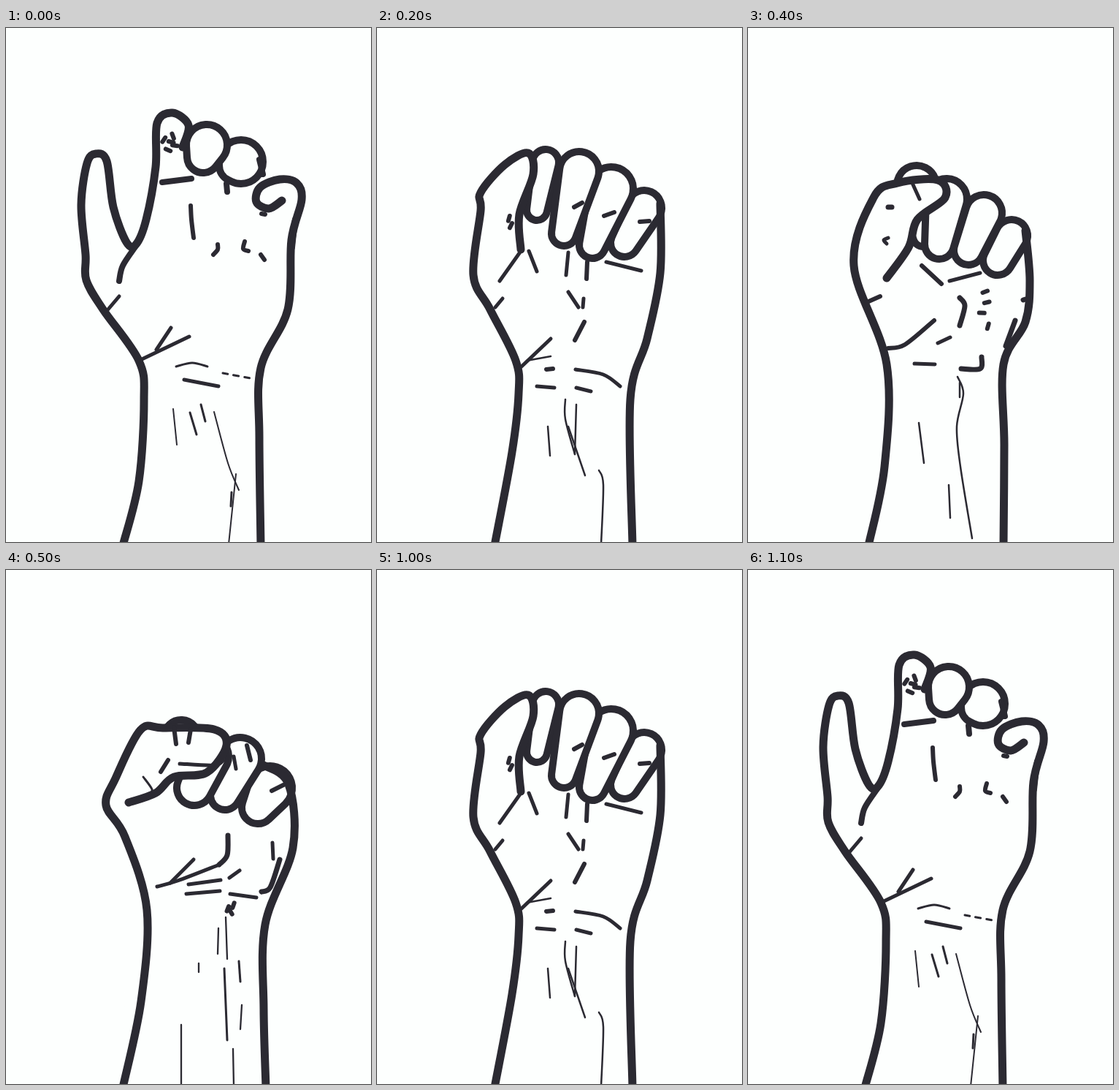
These frames come from a looping animation (500x703 px, 1500 ms). An HTML page with a canvas:

```html
<!DOCTYPE html>
<html lang="en">
<head>
<meta charset="utf-8">
<title>Closing hand</title>
<style>
html, body { margin: 0; height: 100%; overflow: hidden; background: #fdfffe; }
canvas { display: block; }
</style>
</head>
<body>
<canvas id="stage" width="500" height="703"></canvas>
<script>
const ctx = document.getElementById('stage').getContext('2d');
const PAPER = '#fdfffe', INK = '#2b2a32', BOLD = 11;
ctx.lineCap = ctx.lineJoin = 'round';

// Smooth curve through a few key points.
function trace(points) {
  const p = points.split(' ').map(s => s.split(',').map(Number));
  ctx.beginPath();
  ctx.moveTo(...p[0]);
  for (let i = 0; i < p.length - 1; i++) {
    const a = p[i - 1] || p[i], b = p[i], c = p[i + 1], d = p[i + 2] || c;
    ctx.bezierCurveTo(
      b[0] + (c[0] - a[0]) / 6, b[1] + (c[1] - a[1]) / 6,
      c[0] - (d[0] - b[0]) / 6, c[1] - (d[1] - b[1]) / 6, ...c);
  }
}

function ink(width, ...strokes) {
  ctx.lineWidth = width;
  for (const points of strokes) {
    trace(points);
    ctx.stroke();
  }
}

// Thumb side: covers the fingers behind it.
function thumb(points) {
  trace(points);
  ctx.fill();
  ctx.lineWidth = BOLD;
  ctx.stroke();
}

// Tapered finger between two circles, knuckle first.
function finger(x1, y1, r1, x2, y2, r2) {
  const a = Math.atan2(y2 - y1, x2 - x1);
  const d = Math.acos((r1 - r2) / Math.hypot(x2 - x1, y2 - y1));
  ctx.beginPath();
  ctx.arc(x1, y1, r1, a + d, a - d);
  ctx.arc(x2, y2, r2, a - d, a + d);
  ctx.closePath();
  ctx.fill();
  ctx.lineWidth = BOLD - 1;
  ctx.stroke();
}

function random(n) {
  const s = Math.sin(n * 127.1) * 43758.5453;
  return s - Math.floor(s);
}

// Short marks scattered around a point.
function specks(count, x, y, w, h) {
  ctx.lineWidth = 6;
  for (let i = 0; i < count; i++) {
    const px = x + w * (random(x + i) - 0.5);
    const py = y + h * ((i + 0.5) / count - 0.5);
    const a = Math.PI * random(y + i);
    ctx.beginPath();
    ctx.moveTo(px, py);
    ctx.lineTo(px + 7 * Math.cos(a), py + 7 * Math.sin(a));
    ctx.stroke();
  }
}

function open() {
  finger(322, 183, 30, 314, 188, 22);
  finger(275, 160, 28, 270, 176, 22);
  ink(BOLD, '160,708 182,620 189,510 182,455 133,385 110,345 109,310 103,242 111,185 123,172 138,182 147,245 165,293 178,296 192,262 205,190 207,130 228,116 250,133 242,163',
    '378,236 360,247 343,238 348,218 375,207 398,212 405,235 391,290 386,385 349,465 347,560 349,708');
  ink(8, '178,298 160,325 155,346', '347,180 352,200', '302,213 303,224', '214,211 254,206', '396,262 392,300');
  specks(5, 224, 155, 14, 26);
  ink(6, '253,243 254,262 257,287', '290,296 290,303 284,310', '327,292 325,302 332,305', '349,310 354,317', '350,254 355,255');
  ink(5, '182,455 251,422', '226,410 206,440', '155,367 138,387', '244,481 291,490');
  ink(3, '233,463 255,458 276,463', '252,526 261,556', '267,515 273,538', '309,635 308,654');
  ctx.setLineDash([7, 8]);
  ink(3, '297,472 340,480');
  ctx.setLineDash([]);
  ink(2, '229,521 234,570', '285,525 304,595 319,632', '315,610 305,706');
}

function curl() {
  finger(231, 184, 18, 219, 249, 14);
  finger(366, 246, 24, 339, 294, 19);
  finger(321, 220, 30, 295, 297, 18);
  finger(277, 196, 27, 256, 281, 17);
  thumb('161,708 185,580 194,500 190,455 155,385 132,338 142,250 142,225 175,187 207,171 214,200 195,255 197,303');
  ink(BOLD, '388,240 388,335 370,425 347,508 350,708');
  specks(2, 183, 262, 4, 20);
  ink(6, '270,245 281,239', '311,257 325,252', '360,265 373,264', '288,320 287,343', '284,402 271,427', '232,467 241,466');
  ink(5, '195,308 168,346', '172,370 162,382', '208,305 219,333', '262,307 259,338', '262,361 276,382', '283,370 282,382',
    '314,320 362,332', '198,463 238,425', '219,490 243,492', '273,492 293,497', '272,467 310,474 333,490');
  ink(2.5, '205,455 238,449', '258,508 258,535 271,583', '273,515 271,583', '262,545 285,612', '234,545 237,585', '304,605 310,625 307,706');
}

function fold() {
  finger(250, 199, 26, 245, 266, 15);
  finger(378, 262, 24, 357, 314, 18);
  finger(343, 234, 30, 318, 314, 18);
  finger(297, 213, 27, 275, 311, 20);
  thumb('158,708 187,585 194,450 157,345 157,315 179,220 200,210 265,208 265,226 218,260 222,297');
  ink(BOLD, '380,239 401,252 397,350 388,420 356,485 353,600 352,708');
  specks(4, 266, 302, 10, 26);
  specks(3, 372, 305, 20, 16);
  ink(7, '225,303 190,346', '193,367 175,376', '302,387 297,407', '336,366 336,378', '307,340 307,346');
  ink(6, '346,405 360,402', '374,405 376,418', '207,448 250,437 302,416', '281,488 325,497', '288,466 300,470');
  ink(5, '288,246 290,253', '275,342 292,378', '207,445 250,424', '270,443 289,435', '237,462 278,457', '248,482 266,483', '311,474 349,482');
  ink(2.3, '240,530 243,593', '263,552 276,600 276,706', '299,505 304,604', '305,640 306,706', '283,506 287,519');
}

function tuck() {
  finger(231, 215, 27, 240, 285, 14);
  finger(361, 284, 22, 342, 318, 20);
  finger(323, 253, 25, 302, 304, 20);
  finger(272, 234, 28, 262, 296, 20);
  thumb('165,708 187,600 190,460 145,325 172,232 205,212 260,208 270,232 232,262 220,300 190,342');
  ink(BOLD, '380,277 386,345 380,402 350,460 351,570 350,708');
  specks(4, 322, 382, 18, 60);
  ink(7, '290,369 297,380 290,407', '292,466 318,466 320,450', '366,400 353,435', '192,245 197,245', '377,372 380,371');
  ink(6, '163,375 181,367', '238,325 265,350', '255,400 215,433 192,438');
  ink(5, '225,212 235,234', '276,346 318,335', '260,431 277,423', '228,459 256,460', '192,287 186,290 190,295');
  ink(2.5, '287,477 295,500 286,545 291,600 307,698', '290,485 290,505', '234,540 241,595', '275,625 277,670');
}

function fist() {
  finger(240, 229, 24, 240, 250, 10);
  finger(362, 298, 30, 345, 325, 22);
  finger(321, 258, 29, 300, 308, 20);
  finger(278, 255, 27, 258, 298, 24);
  thumb('160,708 185,590 193,465 163,365 137,322 150,285 184,219 215,216 285,218 302,240 275,277 230,283 205,305 168,318');
  ink(BOLD, '351,266 387,293 393,380 355,485 353,600 356,708');
  specks(3, 308, 460, 10, 14);
  ink(7, '304,363 303,390 292,403', '375,396 362,434 350,440');
  ink(6, '230,215 233,238', '253,218 250,236', '212,276 222,260', '364,302 380,294', '335,260 330,240');
  ink(5, '312,255 315,272', '292,403 235,425 207,433', '225,428 257,396', '250,430 294,424', '247,443 293,439',
    '306,421 320,411', '307,443 343,448', '365,373 366,395', '238,265 285,267 298,260');
  ink(3, '299,545 303,643', '319,535 321,563', '188,283 200,300 197,308');
  ink(2.3, '291,490 290,525', '301,475 303,532', '264,538 264,550', '323,595 321,628', '240,622 240,706', '311,655 312,706');
}

// Each pose and the time it ends, in ms.
const steps = [[open, 200], [curl, 300], [fold, 400], [tuck, 500], [fist, 900], [tuck, 1000], [curl, 1100], [open, 1500]];
const start = performance.now();

function draw() {
  const t = (performance.now() - start) % 1500;
  ctx.fillStyle = PAPER;
  ctx.strokeStyle = INK;
  ctx.fillRect(0, 0, 500, 703);
  steps.find(([, end]) => t < end)[0]();
  requestAnimationFrame(draw);
}
draw();
</script>
</body>
</html>
```
